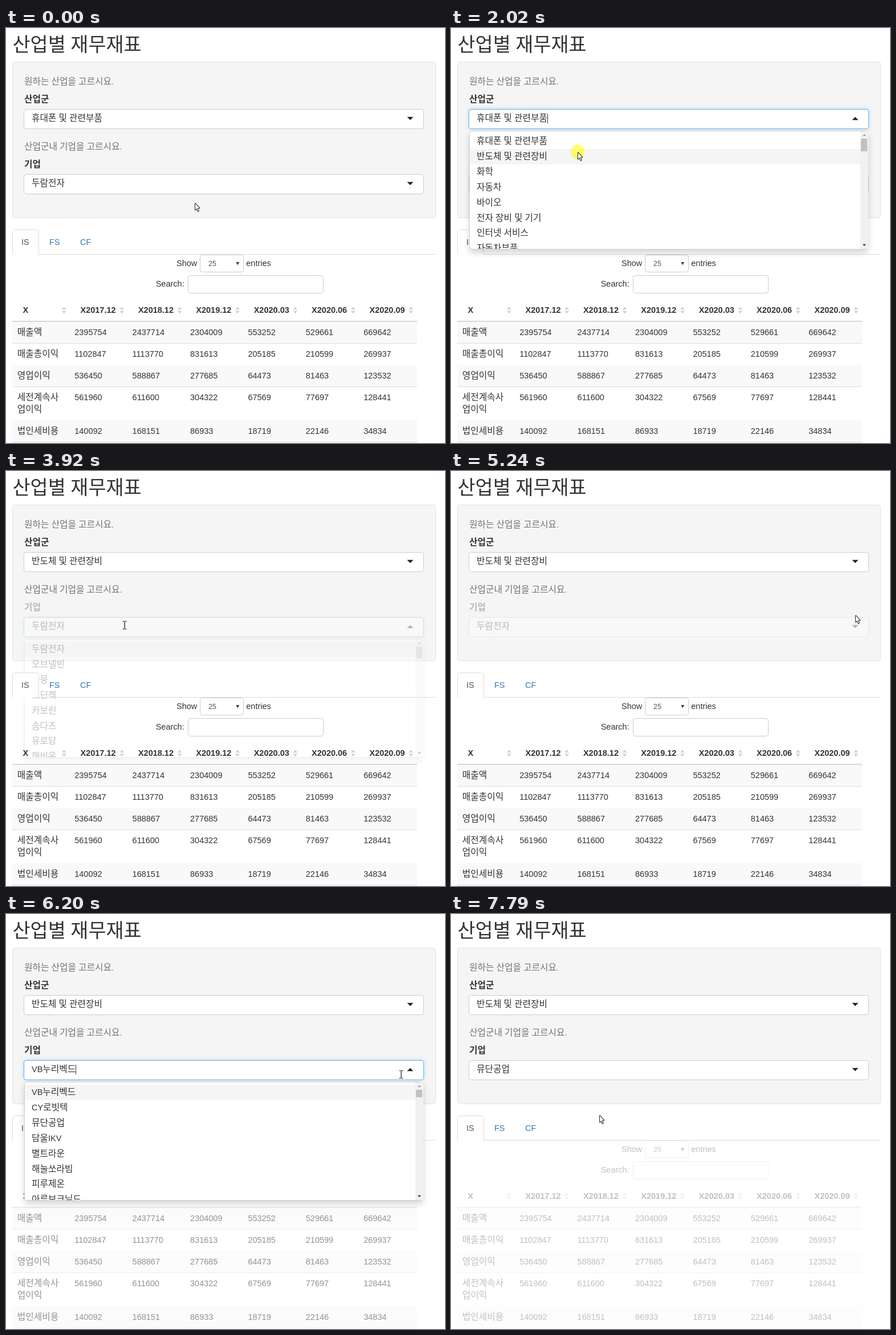
An HTML page with a canvas that plays this animation: 770x727 px, repeating every 8 s.

```html
<!DOCTYPE html>
<html lang="ko">
<head>
<meta charset="utf-8">
<title>산업별 재무재표</title>
<style>
html, body { margin: 0; width: 100%; height: 100%; overflow: hidden; background: #fff; }
canvas { display: block; }
</style>
</head>
<body>
<canvas id="stage" width="770" height="727"></canvas>
<script>
const W = 770, H = 727, LOOP = 8000;
const SIZE = 14.5, ROW = 26.9, COL = 101.4, FIELD_GAP = 114, DIM = 0.3;
const screen2d = document.getElementById('stage').getContext('2d');
const buffer = Object.assign(document.createElement('canvas'), { width: W, height: H });
const buffer2d = buffer.getContext('2d');
let g = screen2d;

const INDUSTRIES = ['휴대폰 및 관련부품', '반도체 및 관련장비', '화학', '자동차', '바이오',
  '전자 장비 및 기기', '인터넷 서비스', '자동차부품'];
const PHONE_FIRMS = ['두람전자', '오브넬빈', '라뭉', '모딘젝', '카보린', '솜다즈', '유로담', '해비온'];
const CHIP_FIRMS = ['VB누리벡드', 'CY로빗텍', '뮤단공업', '담울IKV', '별트라운', '해눌쏘라빔',
  '피루제온', '아루보크닐드'];

const HEADS = 'X2017.12 X2018.12 X2019.12 X2020.03 X2020.06 X2020.09'.split(' ');
const ROWS = [
  '매출액: 2395754 2437714 2304009 553252 529661 669642',
  '매출총이익: 1102847 1113770 831613 205185 210599 269937',
  '영업이익: 536450 588867 277685 64473 81463 123532',
  '세전계속사/업이익: 561960 611600 304322 67569 77697 128441',
  '법인세비용: 140092 168151 86933 18719 22146 34834'
].map(line => {
  const [name, cells] = line.split(': ');
  return { name: name.split('/'), cells: cells.split(' ') };
});

const OPEN_TOP = 920, PICK_TOP = 2090, OPEN_LOW = 3040, BLUR = 4200;
const LOADED = 5600, REOPEN = 5860, PICK_LOW = 7060;
const CLICKS = [OPEN_TOP, PICK_TOP, OPEN_LOW, REOPEN, PICK_LOW];

const HOME = { x: 331, y: 306 };
const MOVES = [
  { from: 20, to: 860, x: 181, y: 159 },
  { from: 1080, to: 1470, x: 254, y: 178 },
  { from: 1560, to: 1930, x: 222, y: 217 },
  { from: 2350, to: 2820, x: 207, y: 270 },
  { from: 3930, to: 4250, x: 225, y: 225 },
  { from: 4390, to: 5240, x: 709, y: 252 },
  { from: 5300, to: 6000, x: 692, y: 281 },
  { from: 6230, to: 6940, x: 260, y: 352 }
];

const between = (t, a, b) => t >= a && t < b;
const clamp = v => Math.max(0, Math.min(1, v));

function pointerAt(t) {
  let { x, y } = HOME;
  for (const m of MOVES) {
    const p = clamp((t - m.from) / (m.to - m.from));
    const e = p * p * (3 - 2 * p);
    x += (m.x - x) * e;
    y += (m.y - y) * e;
  }
  return { x, y };
}

// Waits half a second after a change, then eases down
function dimming(t, since) {
  const p = clamp((t - since - 500) / 250);
  return 1 - (1 - DIM) * (1 - (1 - p) ** 2.2);
}

function layer(alpha, draw) {
  if (alpha === 1) return draw();
  g = buffer2d;
  g.clearRect(0, 0, W, H);
  draw();
  g = screen2d;
  g.globalAlpha = alpha;
  g.drawImage(buffer, 0, 0);
  g.globalAlpha = 1;
}

function text(str, x, y, color = '#333', size = SIZE, bold = false) {
  g.fillStyle = color;
  for (const run of str.match(/[가-힣]+|[^가-힣]+/g)) {
    g.font = /[가-힣]/.test(run)
      ? `${bold ? 700 : 300} ${size * 1.087}px "Noto Sans CJK KR", "Noto Sans CJK", "Noto Sans KR", sans-serif`
      : `${bold ? 700 : 400} ${size}px "Liberation Sans", Arial, sans-serif`;
    g.fillText(run, x, y);
    x += g.measureText(run).width;
  }
  return x;
}

const boldText = (str, x, y) => text(str, x, y, '#333', SIZE, true);

function rect(x, y, w, h, color) {
  g.fillStyle = color;
  g.fillRect(x, y, w, h);
}

function box(x, y, w, h, fill, line) {
  g.beginPath();
  g.roundRect(x, y, w, h, 4);
  g.fillStyle = fill;
  g.fill();
  g.shadowColor = 'transparent';
  g.strokeStyle = line;
  g.lineWidth = 1;
  g.stroke();
}

function shadow(color, blur, dy = 0) {
  g.shadowColor = color;
  g.shadowBlur = blur;
  g.shadowOffsetY = dy;
}

// Triangle centred on (x, y); a negative h points up
function tri(x, y, w, h, color) {
  g.beginPath();
  g.moveTo(x - w / 2, y - h / 2);
  g.lineTo(x + w / 2, y - h / 2);
  g.lineTo(x, y + h / 2);
  g.fillStyle = color;
  g.fill();
}

function field(dy, label, value, openedAt, t) {
  const open = openedAt !== null;
  boldText(label, 32, 130 + dy);
  if (open) shadow('rgba(102,175,233,.5)', 6);
  box(31.5, 142.5 + dy, 701, 34, '#fff', open ? '#66afe9' : '#ccc');
  const end = text(value, 45, 163 + dy);
  tri(709, 158.5 + dy, 11, open ? -5.5 : 5.5, '#222');
  const blinkOn = open && Math.floor((t - openedAt) / 500) % 2 === 0;
  if (blinkOn) rect(Math.round(end), 150 + dy, 1, 17, '#333');
}

function dropdown(top, items, thumb, pointer) {
  shadow('rgba(0,0,0,.175)', 12, 6);
  box(32.5, top + 0.5, 699, 207, '#fff', '#d0d0d0');
  g.save();
  g.beginPath();
  g.rect(33, top + 1, 699, 206);
  g.clip();
  const hover = Math.max(0, Math.floor((pointer.y - top - 4) / ROW));
  rect(33, top + 5 + hover * ROW, 685, ROW, '#f5f5f5');
  items.forEach((item, i) => text(item, 45, top + 23 + i * ROW));
  rect(718, top + 1, 14, 206, '#f1f1f1');
  rect(719, top + 14, 11, thumb, '#c1c1c1');
  tri(725, top + 7.5, 6, -3.5, '#a3a3a3');
  tri(725, top + 200.5, 6, 3.5, '#404040');
  g.restore();
}

function well() {
  text('산업별 재무재표', 11.5, 41, '#333', 31.07);
  box(11.5, 59.5, 742, 273, '#f5f5f5', '#e3e3e3');
  text('원하는 산업을 고르시요.', 32, 99, '#737373');
  text('산업군내 기업을 고르시요.', 32, 99 + FIELD_GAP, '#737373');
}

function tabs() {
  rect(57, 396, 696, 1, '#ddd');
  g.save();
  g.beginPath();
  g.rect(11, 353, 47, 44);
  g.clip();
  box(11.5, 353.5, 46, 60, '#fff', '#ddd');
  g.restore();
  text('IS', 27, 380, '#555');
  text('FS', 76, 380, '#337ab7');
  text('CF', 130, 380, '#337ab7');
}

function sortMark(x) {
  tri(x, 490.7, 8, -5, '#d3d3d3');
  tri(x, 498, 8, 5, '#d3d3d3');
}

function table() {
  text('Show', 299, 417);
  box(340.5, 397.5, 76, 30, '#fff', '#ccc');
  text('25', 355, 417, '#555', 12.4);
  tri(406.3, 412.7, 6, 5.5, '#444');
  text('entries', 421.3, 417);
  text('Search:', 262.7, 453);
  box(319.5, 433.5, 237, 31, '#fff', '#ccc');

  boldText('X', 29.5, 499);
  sortMark(101.8);
  HEADS.forEach((head, i) => {
    boldText(head, 130.5 + i * COL, 499);
    sortMark(203.2 + i * COL);
  });

  let top = 514;
  ROWS.forEach((row, i) => {
    const h = 17.5 + 20.5 * row.name.length;
    if (i % 2 === 0) rect(11, top, 710, h, '#f9f9f9');
    row.name.forEach((line, k) => text(line, 19.8, top + 24 + k * 20.5));
    row.cells.forEach((cell, k) => text(cell, 120.2 + k * COL, top + 24));
    top += Math.round(h);
    if (row.name.length === 1) top -= i < ROWS.length ? 0 : 1;
    rect(11, top, 710, 1, '#ddd');
  });
  rect(11, 513, 710, 1.5, '#ccc');
}

function inkedShape() {
  g.lineJoin = 'round';
  g.strokeStyle = '#222';
  g.lineWidth = 2;
  g.stroke();
  g.fillStyle = '#fff';
  g.fill();
}

const shapes = {
  arrow() {
    g.beginPath();
    g.moveTo(1, 1.5);
    g.lineTo(1, 12.5);
    g.lineTo(3.5, 10);
    g.lineTo(5.6, 15);
    g.lineTo(6.8, 14.4);
    g.lineTo(4.8, 9.6);
    g.lineTo(8.4, 9.4);
    g.closePath();
    inkedShape();
  },
  hand() {
    g.beginPath();
    g.roundRect(-1.2, 1, 2.4, 12, 1.2);
    g.roundRect(-1.2, 7, 9.8, 9, 2.5);
    g.roundRect(0.6, 12, 6.6, 6, 0.5);
    g.moveTo(-1, 10.5);
    g.lineTo(-3.7, 10.8);
    g.lineTo(0.8, 17);
    inkedShape();
    for (let i = 0; i < 3; i++) rect(1.3 + i * 2.6, 7, 0.8, 3, '#444');
  },
  beam() {
    rect(0.5, -6.5, 1.3, 13, '#222');
    for (const y of [-7.3, 6.2]) {
      rect(-2.3, y, 2.8, 1.1, '#222');
      rect(1.8, y, 2.8, 1.1, '#222');
    }
  }
};

function pointer(p, topOpen, lowOpen, t) {
  if (CLICKS.some(c => between(t, c - 100, c + 130))) {
    g.beginPath();
    g.arc(p.x, p.y, 12.4, 0, 7);
    g.fillStyle = 'rgba(255,255,0,.58)';
    g.fill();
  }
  let shape = 'arrow';
  if (between(p.y, 142, 177)) shape = topOpen ? 'beam' : 'hand';
  if (between(p.y, 256, 291)) shape = lowOpen ? 'beam' : 'hand';
  if (topOpen && p.y > 180) shape = 'arrow';
  g.save();
  g.translate(Math.round(p.x), Math.round(p.y));
  shapes[shape]();
  g.restore();
}

function draw(t) {
  const p = pointerAt(t);
  const loaded = t >= LOADED;
  const topOpen = between(t, OPEN_TOP, PICK_TOP);
  const lowStart = loaded ? REOPEN : OPEN_LOW;
  const lowOpen = between(t, lowStart, loaded ? PICK_LOW : BLUR);
  const firms = loaded ? CHIP_FIRMS : PHONE_FIRMS;
  const firm = firms[t >= PICK_LOW ? 2 : 0];
  const lowMenu = () => dropdown(180 + FIELD_GAP, firms, loaded ? 13 : 20, p);

  rect(0, 0, W, H, '#fff');
  well();
  field(0, '산업군', INDUSTRIES[t < PICK_TOP ? 0 : 1], topOpen ? OPEN_TOP : null, t);
  layer(loaded ? 1 : dimming(t, PICK_TOP), () => {
    field(FIELD_GAP, '기업', firm, lowOpen ? lowStart : null, t);
    if (lowOpen && !loaded) lowMenu();
  });
  layer(dimming(t, LOADED), table);
  tabs();
  if (topOpen) dropdown(180, INDUSTRIES, 22, p);
  if (lowOpen && loaded) lowMenu();
  pointer(p, topOpen, lowOpen, t);
}

const start = performance.now();
function tick() {
  draw((performance.now() - start) % LOOP);
  requestAnimationFrame(tick);
}
tick();
</script>
</body>
</html>
```
